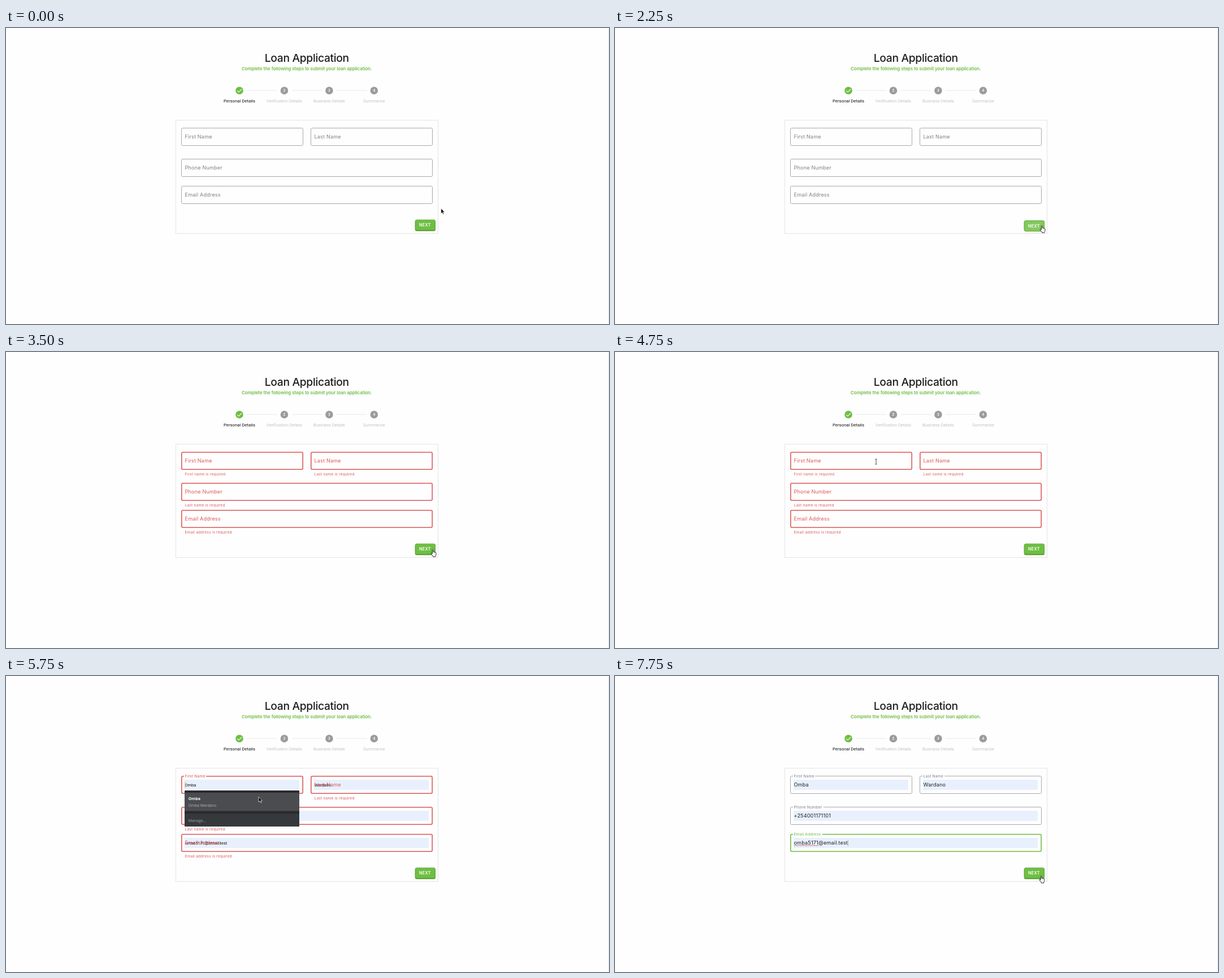
These frames come from a looping animation (1067x525 px, 8 s). An HTML page:

```html
<!DOCTYPE html>
<html lang="en">
<head>
<meta charset="utf-8">
<title>Loan Application</title>
<style>
  html, body { margin: 0; width: 100%; height: 100%; overflow: hidden; background: #fefefe; }
  svg { display: block; width: 1067px; height: 525px; font-family: Inter, sans-serif; }
  .mid { text-anchor: middle; }
  .title { font-size: 19.3px; font-weight: 500; letter-spacing: -.34px; fill: #1d1d1d; }
  .sub { font-size: 8px; font-weight: 600; letter-spacing: -.09px; fill: #6fbe44; }
  .step { font: 300 7.75px Roboto, sans-serif; fill: #a8a8a8; }
  .step.on { font-weight: 400; fill: #111; }
  .num { font: 500 6.7px Roboto, sans-serif; fill: #fff; }
  .label, .value { font-size: 9.1px; letter-spacing: .17px; }
  .value { fill: #222; }
  .value.preview { font: 7.4px Roboto, sans-serif; letter-spacing: 0; fill: #111; }
  .help { font-size: 6.67px; letter-spacing: .17px; fill: #de5f5f; }
  .next { font-size: 7.3px; font-weight: 600; letter-spacing: .3px; fill: #fff; }
  #menu { font: 6.7px "Open Sans", sans-serif; }
</style>
</head>
<body>
<svg viewBox="0 0 1067 525">
  <path d="M1066.5 0V525" stroke="#e6e6e6"/>
  <text class="title mid" x="532.3" y="60">Loan Application</text>
  <text class="sub mid" x="532.3" y="74.8">Complete the following steps to submit your loan application.</text>
  <g id="steps"></g>
  <rect x="300.5" y="163.5" width="464" height="201" fill="none" stroke="#e4e4e4"/>
  <g id="fields"></g>
  <g id="button">
    <rect id="edge" x="723.8" y="341" width="36.2" height="19.2" rx="3" fill="#519a2d"/>
    <rect id="face" x="724.2" y="340.2" width="35.4" height="18.4" rx="2.7" stroke="#5da637" stroke-width=".8"/>
    <text class="next" x="731" y="352.3">NEXT</text>
  </g>
  <path id="caret"/>
  <path id="spell" stroke="#e0525a" stroke-width=".8"/>
  <g id="menu">
    <rect x="316" y="203" width="203" height="64" rx="1" fill="#292a2d"/>
    <rect id="hover" x="316" y="207" width="203" height="32.5" fill="#4b4c4f"/>
    <rect x="316" y="244" width="203" height="23" rx="1" fill="#35393c"/>
    <text x="322.8" y="219.6" font-size="7" font-weight="700" fill="#fff">Omba</text>
    <text x="322.8" y="231.8" fill="#b4b5b8">Omba Wardano</text>
    <text x="322.8" y="258.6" font-size="6.9" fill="#a0a3a6">Manage...</text>
  </g>
  <g id="cursor">
    <path id="arrow" d="M0 0V9.2L2.1 7.3 3.6 10.6 5 10 3.6 6.8H6.4Z" fill="#000" stroke="#fff" stroke-width=".7"/>
    <path id="hand" d="M2.6 7.6V1.4Q2.6 .4 3.5 .4T4.4 1.4V4.6Q6 4.2 6.2 5Q7.6 4.6 7.8 5.5Q9.2 5.2 9.2 6.6V9Q9 10.6 8.2 11.4V12.8H3.6V11.6Q1.6 9.4 .5 7.6Q.4 6.3 1.5 6.5Q2.2 6.9 2.6 7.6Z" fill="#fff" stroke="#111" stroke-width=".9"/>
    <path id="beam" d="M-1.6 0H1.6M0 0V9M-1.6 9H1.6" fill="none" stroke="#222" stroke-width=".8"/>
  </g>
</svg>
<script>
const LOOP = 8000, TICK = 250;
const GREEN = '#6fbe44', RED = '#dc5858', GREY = '#a8a8a8';
const $ = id => document.getElementById(id);
const show = (el, on) => el.setAttribute('opacity', on ? 1 : 0);
const set = (el, attrs) => { for (const k in attrs) el.setAttribute(k, attrs[k]); };

$('steps').innerHTML = ['Personal Details', 'Verification Details', 'Business Details', 'Summarize']
  .map((name, i) => {
    const x = 413 + i * 79.45;
    return (i ? `<path d="M${x - 66.5} 110.8h54" stroke="#dedede" stroke-width=".7"/>` : '') +
      `<circle cx="${x}" cy="111" r="6.8" fill="${i ? '#9b9b9b' : GREEN}"/>` +
      (i ? `<text class="num mid" x="${x}" y="113.4">${i + 1}</text>`
         : `<path d="M${x - 3.8} 111.2l2.6 2.6 5.2-5.3" fill="none" stroke="#fff" stroke-width="1.1"/>`) +
      `<text class="step mid ${i ? '' : 'on'}" x="${x}" y="132.3">${name}</text>`;
  }).join('');

// outer x, y, width, label, notch width, value, helper text
const HEIGHT = 32;
const fields = [
  [310, 177, 216, 'First Name', 39, 'Omba', 'First name is required'],
  [539, 177, 216, 'Last Name', 39, 'Wardano', 'Last name is required'],
  [310, 232, 445, 'Phone Number', 54, '+254001171101', 'Last name is required'],
  [310, 280, 445, 'Email Address', 52, 'omba5171@email.test', 'Email address is required']
].map(([x, y, w, label, notch, value, help]) => {
  const g = document.createElementNS('http://www.w3.org/2000/svg', 'g');
  g.innerHTML = `<rect rx="2.2" fill="none"/>
    <rect x="${x + 5}" y="${y - .5}" height="3" fill="#fefefe"/>
    <rect x="${x + 6}" y="${y + 7}" width="${w - 13}" height="18" fill="#e8f0fe"/>
    <text class="value" x="${x + 6.5}" y="${y + 19.2}">${value}</text>
    <text class="label">${label}</text>
    <text class="help" x="${x + 6.5}" y="${y + 42}">${help}</text>`;
  $('fields').append(g);
  const [box, gap, fill, val, lab, hint] = g.children;
  return { x, y, w, notch, box, gap, fill, val, lab, hint };
});

function drawField(f, { color, float, filled, preview, error, thick }) {
  // the border grows inward
  const line = thick ? 1.6 : 1;
  set(f.box, {
    x: f.x + line / 2, y: f.y + line / 2, width: f.w - line, height: HEIGHT - line,
    stroke: color, 'stroke-width': line
  });
  set(f.gap, { width: f.notch * float ** .8 });
  set(f.lab, {
    transform: `translate(${f.x + 6.5} ${f.y + 19.2 - 15.8 * float}) scale(${1 - .25 * float})`,
    fill: color === GREY ? '#808080' : color
  });
  show(f.fill, filled || preview);
  show(f.val, filled || preview);
  f.val.setAttribute('class', preview ? 'value preview' : 'value');
  show(f.hint, error);
}

// start time, pointer, x, y
const moves = [
  [0, 'arrow', 769.8, 320], [250, 'arrow', 775, 358],
  [1250, 'hand', 737, 343], [1500, 'hand', 747, 348], [1750, 'hand', 751.8, 350.2],
  [4000, 'arrow', 715, 328], [4250, 'arrow', 610, 266], [4500, 'arrow', 505, 212],
  [4750, 'beam', 462, 190], [5500, 'arrow', 459.5, 205.3], [5750, 'arrow', 447, 214.3],
  [6000, 'arrow', 442.3, 217.3], [6750, 'arrow', 520, 250], [7000, 'arrow', 615, 288],
  [7250, 'arrow', 700, 322], [7500, 'arrow', 749, 338], [7750, 'hand', 750.6, 354.2]
];

function draw(t) {
  const pressed = t >= 2250 && t < 2750;
  const error = t >= 2750 && t < 6500;
  const focused = t >= 5000 && error;
  const preview = t >= 5750 && error;
  const filled = t >= 6500;

  fields.forEach((f, i) => {
    const active = filled && i === 3;
    const float = filled ? (t < 6750 && i ? .86 : 1)
      : focused && !i ? (t < 5250 ? .5 : 1) : 0;
    drawField(f, {
      color: error ? RED : active ? GREEN : GREY,
      float, filled, preview, thick: error || active,
      error: error && !(focused && !i)
    });
  });

  const mail = fields[3], left = mail.x + 6.5;
  const end = left + mail.val.getComputedTextLength();
  show($('caret'), focused || filled);
  set($('caret'), filled
    ? { d: `M${end + .3} 290.5v11.5`, stroke: GREEN, 'stroke-width': .7 }
    : { d: 'M317 187v12', stroke: '#d08a80', 'stroke-width': .7 });
  show($('spell'), filled);
  set($('spell'), { d: `M${left} 300.8h${mail.val.getSubStringLength(0, 8)}` });

  set($('button'), { transform: `translate(0 ${pressed ? 1.8 : 0})` });
  set($('face'), { fill: pressed ? '#84c95c' : GREEN });
  set($('edge'), { y: pressed ? 339.6 : 341 });

  show($('menu'), t >= 5250 && error);
  show($('hover'), preview);

  const [, kind, x, y] = moves.filter(m => m[0] <= t).pop();
  set($('cursor'), { transform: `translate(${x} ${y})` });
  for (const id of ['arrow', 'hand', 'beam']) show($(id), id === kind);
}

let start;
function loop(now) {
  start ??= now;
  const t = (now - start) % LOOP;
  draw(t - t % TICK);
  requestAnimationFrame(loop);
}
draw(0);
requestAnimationFrame(loop);
</script>
</body>
</html>
```
